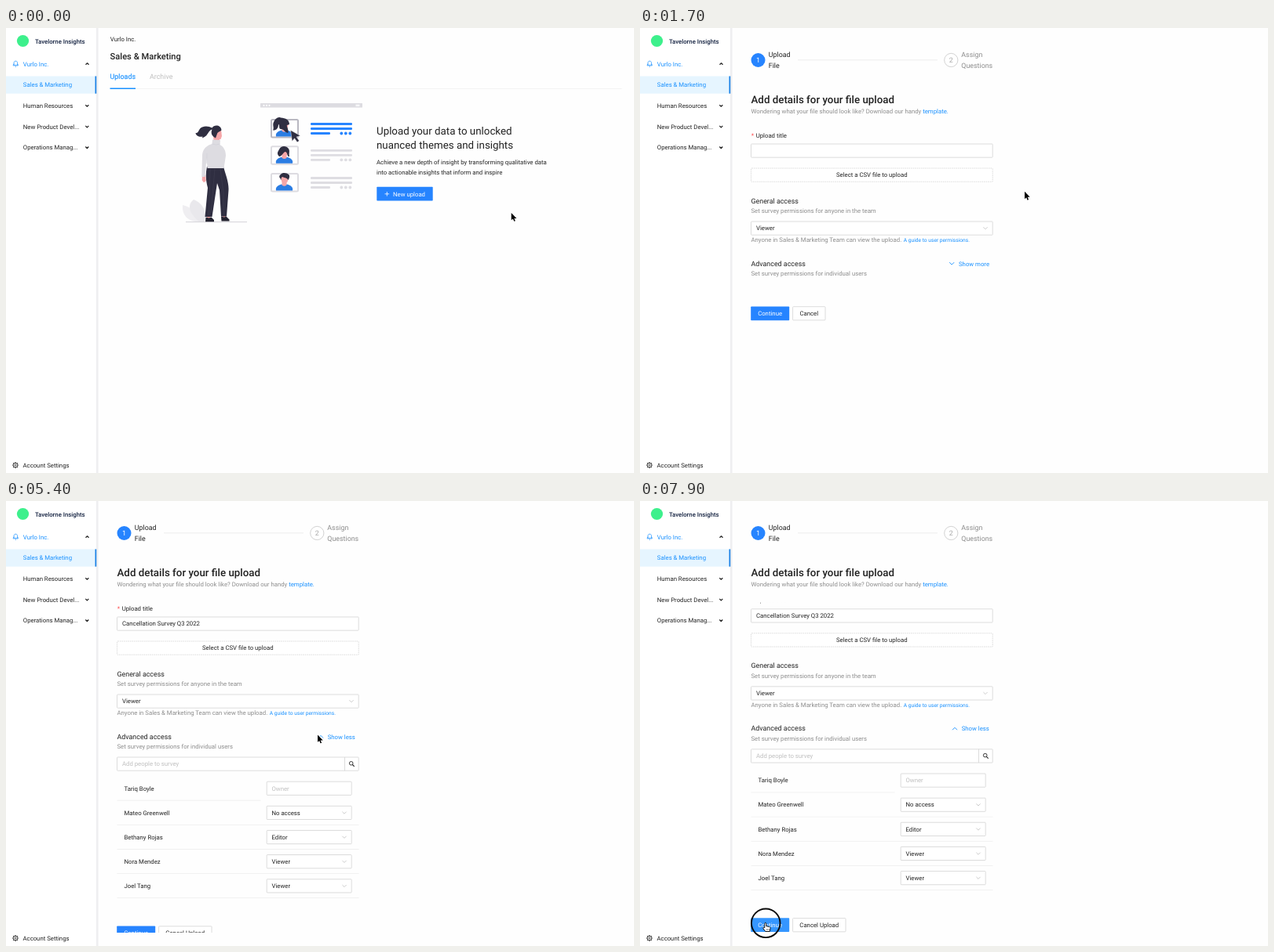
An HTML page for the animation above (8 s loop, 800 by 568 pixels).

```html
<!DOCTYPE html>
<html lang="en">
<head>
<meta charset="utf-8">
<title>Upload flow</title>
<style>
html, body { margin: 0; width: 100%; height: 100%; overflow: hidden; background: #fefefe; }
svg { display: block; width: 100vw; height: 100vh; font-family: Roboto, "Liberation Sans", sans-serif; text-rendering: geometricPrecision; }
text { white-space: pre; }
</style>
</head>
<body>
<svg id="stage" viewBox="0 0 800 568" preserveAspectRatio="none"></svg>
<script>
const INK = '#222', GREY = '#8c8c8c', PALE = '#bfbfbf', LINK = '#1890ff', BLUE = '#2684ff';
const DARK = '#2f2e41', SKIN = '#f5a6a8', CLOTH = '#dddce1', LINE = '#d4d4d4';
const S = 7.78, M = 8.89, L = 13.33;

const text = (x, y, s, size = S, fill = INK, more = '') =>
  `<text x="${x}" y="${y}" font-size="${size}" fill="${fill}" ${more}>${s.replace(/&/g, '&amp;')}</text>`;
const mid = (x, y, s, size = S, fill = INK) => text(x, y, s, size, fill, 'text-anchor="middle"');
const rect = (x, y, w, h, fill, more = '') =>
  `<rect x="${x}" y="${y}" width="${w}" height="${h}" fill="${fill}" ${more}/>`;
const box = (x, y, w, h = 17.2, more = '') =>
  rect(x, y, w, h, '#fff', `stroke="${LINE}" stroke-width=".8" rx=".8" ${more}`);
const disc = (x, y, r, fill, more = '') => `<circle cx="${x}" cy="${y}" r="${r}" fill="${fill}" ${more}/>`;
const shape = (d, fill, more = '') => `<path d="${d}" fill="${fill}" ${more}/>`;
const stroke = (d, color, w = .8, more = '') =>
  `<path d="${d}" fill="none" stroke="${color}" stroke-width="${w}" ${more}/>`;
const chevron = (x, y, r, color, w, up) => {
  const h = (up ? -1 : 1) * r / 2;
  return stroke(`M${x - r} ${y - h}L${x} ${y + h}L${x + r} ${y - h}`, color, w);
};
const group = (id, body, more = '') => `<g id="${id}" ${more}>${body}</g>`;

function sidebar() {
  const items = ['Human Resources', 'New Product Devel...', 'Operations Manag...'];
  let teeth = '';
  for (let i = 0; i < 8; i++) {
    const a = i * Math.PI / 4, c = Math.cos(a), s = Math.sin(a);
    teeth += `M${12 + 2.8 * c} ${558 + 2.8 * s}L${12 + 3.9 * c} ${558 + 3.9 * s}`;
  }
  return rect(0, 0, 115, 568, '#fff') +
    rect(115, 0, 2.5, 568, '#eeeef0') +
    disc(21.5, 16.5, 7.6, '#3df08c') +
    text(37, 19.7, 'Tavelorne Insights', S, '#12203f', 'font-weight="500"') +
    stroke('M12.3 42.2c2.2 0 2.2 1.6 2.2 3.2v2h-4.4v-2c0-1.6 0-3.2 2.2-3.2zM10 45.5l-1 2.2 1.8.6M14.6 45.5l1 2.2-1.8.6M12.3 47.5v2.6', LINK, .7) +
    text(21.8, 48.7, 'Vurlo Inc.', S, LINK) +
    chevron(103.5, 45.8, 2, INK, 1.3, true) +
    rect(0, 61.5, 115, 22.2, '#e6f5ff') + rect(113.5, 61.5, 1.7, 22.2, '#1980e6') +
    text(21.8, 75.3, 'Sales & Marketing', S, LINK) +
    items.map((s, i) => text(21.8, 102.1 + 26.67 * i, s) + chevron(103.3, 99.2 + 26.67 * i, 2, INK, 1.3)).join('') +
    disc(12, 558, 2.8, 'none', 'stroke="#333" stroke-width=".8"') +
    disc(12, 558, 1.1, 'none', 'stroke="#333" stroke-width=".7"') + stroke(teeth, '#333', 1.2) +
    text(21.5, 560.7, 'Account Settings');
}

function woman() {
  return shape('M244 247C232 247 224 239 225 226C237 229 244 236 247 247Z', '#efeef1') +
    shape('M246 247C232 236 231 225 239 219C252 224 256 236 253 247Z', '#e9e8ec') +
    stroke('M229 247.6H307', '#c9c8d0', .8) +
    shape('M256 236h5l-1 7h-4zM275 234h5v8h-4z', SKIN) +
    shape('M254.5 241.5l4 1 3-1 3.500 3.500v2.300h-11zM274 240.500l4 1 2.500-1 4 4v2h-10z', '#23222f') +
    shape('M250 187l4 1 .8 7-2.800 2.200-2.300-3z', SKIN) +
    shape('M256 177H277C280 188 284 197 283.500 207L281 240.500H274L272 207L269 198L262.500 241H253.500L257 204C254.500 195 254 186 256 177Z', DARK) +
    stroke('M260 180L258.500 239M266 180L261 236M273 180L277 210L277.500 238', '#48475a', .4) +
    shape('M264 138l8-1v9l-7 2z', SKIN) +
    shape('M263 142.500L273 143L272.500 149C278 152 280 157 280 163L277.500 179H256.500L255.500 166L253.500 190H249.300L250 164C250 154 256 150 262.500 148Z', CLOTH) +
    stroke('M256 160l-.4 13M262.500 148q5 2 10 0', '#cbcad2', .5) +
    shape('M264 130C269 126 275 129 274.500 134L275 138L273.500 142L268 142L264 138Z', SKIN) +
    shape('M274.500 130.500C272 133 270 132 269 135L267 140.500C262 138 260.500 134 262.500 129.500C257 131 258 138 250 140.500L250.500 138.500C246 139.500 242 137.500 241.500 134C246 135 245 128 250 126.500C255 124.500 259 126 262.500 127.500C265 123 274 123.500 274.500 130.500Z', DARK);
}

function card(y, edge, hair) {
  return rect(338, y + 1, 34, 22.5, '#fff', `stroke="${edge}" stroke-width="2" rx="1.5"`) +
    shape(`M344 ${y + 22.5}C343 ${y + 18} 346 ${y + 16} 351 ${y + 14.5}H358C363 ${y + 16} 366 ${y + 18} 365 ${y + 22.500}Z`, '#2b7de3') +
    shape(`M351.500 ${y + 9}h6v6.500q-3 2.500-6 0z`, SKIN) +
    `<ellipse cx="355" cy="${y + 7.500}" rx="4.500" ry="6" fill="${SKIN}"/>` + shape(hair, DARK);
}

function lines(y, color) {
  const bar = (dy, w) => rect(388, y + dy - 1.4, w, 2.8, color, 'rx="1.2"');
  return bar(0, 53) + bar(6, 53) + bar(12, 25) +
    [427.3, 432.8, 438.3].map(x => disc(x, y + 12, 1.9, color)).join('');
}

function landing() {
  const art = rect(324, 96, 130, 5.600, '#dddce1', 'rx=".6"') +
    [328.500, 332, 335.500].map(x => disc(x, 98.800, 1.100, '#fff')).join('') +
    rect(445.500, 97.500, 5, 2.600, '#f6f6f8') +
    card(116, '#b9b8c1', 'M350 129C347 129 349 123 347 123C347 128 344 131 340 130.500C342 127 339 124 341 120C343 116 346 113 350 114.500C356 115 361 117 361 123L358 124C357 125 360 128 359.500 134C354 133 355 129 350 129Z') +
    card(150.300, CLOTH, 'M348 164C344 160 347 157 348 155C350 150 357 150 360 154C362 157 360 160 361 164C358 165 359 159 356 158C353 158 352 164 348 164Z') +
    card(185, CLOTH, 'M349.500 192C347 190 349 187 350 187C352 184 358 185 360 187C362 188 361 192 359.500 194C358 191 354 191 352 190C350 191 351 194 350 194Z') +
    shape('M362.500 130.500L375 137.500L370 139L373.500 144L371 145.800L367.500 140.800L364.500 144.500Z', DARK, 'stroke="#fff" stroke-width=".4"') +
    lines(122.500, BLUE) + lines(156.300, '#dedde2') + lines(191.500, '#dedde2');
  const label = stroke('M482.500 211.800h5.600M485.300 209v5.600', '#fff', .8) + text(493, 214.600, 'New upload', S, '#fff');
  return text(132.800, 17, 'Vurlo Inc.') +
    text(132.600, 39.500, 'Sales & Marketing', 11.11, INK, 'font-weight="500"') +
    text(132.600, 65.300, 'Uploads', M, LINK, `stroke="${LINK}" stroke-width=".15"`) +
    text(183, 65.300, 'Archive', M, PALE) +
    rect(132.500, 77.300, 652, .7, '#f0f0f0') + rect(132.500, 76.500, 32.500, 1.500, LINK) +
    art + woman() +
    text(472, 136.300, 'Upload your data to unlocked', L) +
    text(472, 154.100, 'nuanced themes and insights', L) +
    text(472, 174.200, 'Achieve a new depth of insight by transforming qualitative data') +
    text(472, 186.700, 'into actionable insights that inform and inspire') +
    group('idle', rect(472.300, 202.800, 71.400, 17.800, BLUE, 'rx=".8"') + label) +
    group('hover', rect(472, 205, 72, 17.500, '#0002', 'rx="1"') +
      rect(471.800, 203.300, 72.200, 17.800, '#2a72dc', 'rx="1"') +
      `<g transform="translate(0 .5)" opacity=".85">${label}</g>`);
}

function buttons(y, label, w, id) {
  return rect(141.200, y, 49, 17.800, BLUE, `rx=".8" ${id}`) + mid(165.600, y + 11.600, 'Continue', S, '#fff') +
    box(194.600, y + .3, w) + mid(194.600 + w / 2, y + 11.600, label);
}

function people() {
  const rows = [['Tariq Boyle', 'Owner'], ['Mateo Greenwell', 'No access'], ['Bethany Rojas', 'Editor'],
    ['Nora Mendez', 'Viewer'], ['Joel Tang', 'Viewer']];
  return rows.map(([name, role], i) => {
    const y = 366.800 + 31.130 * i;
    return text(150.500, y + 2.700, name) + box(332.200, y - 8.600, 108) +
      text(338.500, y + 2.700, role, S, i ? INK : PALE) +
      (i ? chevron(431, y, 2.600, PALE, .8) : '') +
      rect(141.500, y + 15, i ? 308 : 183, .7, '#ececec');
  }).join('');
}

function form() {
  const head = disc(150.500, 41, 9, BLUE) + mid(150.500, 44.100, '1', M, '#fff') +
    text(163.800, 37.300, 'Upload', M) + text(163.800, 50.700, 'File', M) +
    rect(201, 40.500, 178, .8, '#e9e9e9') +
    disc(396.300, 41, 8.600, '#fff', `stroke="${PALE}" stroke-width=".7"`) + mid(396.300, 44.100, '2', M, '#a8a8a8') +
    text(409.300, 37.300, 'Assign', M, GREY) + text(409.300, 50.700, 'Questions', M, GREY) +
    text(141.500, 95.700, 'Add details for your file upload', L, INK, 'font-weight="500"') +
    `<text x="141.500" y="109.200" font-size="${S}" fill="${GREY}">Wondering what your file should look like? Download our handy <tspan fill="${LINK}">template.</tspan></text>`;
  const fields = text(141.800, 140, '*', S, '#ff4d4f') + text(147.700, 139.500, 'Upload title') +
    box(141.500, 148, 307.700) + group('title', text(148, 159.200, 'Cancellation Survey Q3 2022')) +
    box(141.500, 179, 307.700, 17.200, 'stroke-dasharray="1.600 1"') + mid(295.300, 190.200, 'Select a CSV file to upload') +
    text(141.500, 223.500, 'General access', M) +
    text(141.500, 236.300, 'Set survey permissions for anyone in the team', S, GREY) +
    box(141.500, 247, 307.700) + text(148, 258.300, 'Viewer') + chevron(440, 255.500, 2.600, PALE, .8) +
    text(141.500, 273.100, 'Anyone in Sales & Marketing Team can view the upload.', S, GREY) +
    text(335.800, 273.100, 'A guide to user permissions.', 6.670, LINK) +
    text(141.500, 303.700, 'Advanced access', M) +
    text(141.500, 316.300, 'Set survey permissions for individual users', S, GREY);
  const closed = chevron(397.200, 300.600, 3, LINK, .9) + text(406, 303.500, 'Show more', S, LINK) +
    buttons(355.400, 'Cancel', 41.400, '');
  const open = chevron(401, 300.900, 3, LINK, .9, true) + text(409.700, 303.500, 'Show less', S, LINK) +
    box(141.500, 327, 307.700) + rect(431.200, 327, .8, 17.200, LINE) +
    text(148, 338.300, 'Add people to survey', S, PALE) +
    disc(439.700, 334.800, 2.300, 'none', `stroke="${INK}" stroke-width=".9"`) +
    stroke('M441.400 336.500l2.300 2.300', INK, 1.100) +
    people() + buttons(542.500, 'Cancel Upload', 67.400, 'id="go"');
  return head + `<g clip-path="url(#pane)">` +
    group('scroll', fields + group('closed', closed) + group('open', open)) + '</g>';
}

document.getElementById('stage').innerHTML =
  '<clipPath id="pane"><rect x="120" y="129.700" width="680" height="421.300"/></clipPath>' +
  rect(0, 0, 800, 568, '#fefefe') + sidebar() + group('landing', landing()) + group('form', form()) +
  disc(160.200, 538.800, 18.300, 'none', 'id="ring" stroke="#0a0a0a" stroke-width="1.900"') +
  group('arrow', shape('M0 0V9.300L2.100 7.400 3.600 10.800 5.100 10.200 3.700 6.900H6.700Z', '#000',
    'stroke="#fff" stroke-width="1.100" paint-order="stroke"')) +
  group('hand', shape('M-1.200 1C-1.200-.5 .9-.5 .9 1V4.200L4.600 4.900C6 5.300 6.200 6 6 7.200L5.200 11H-.2L-3 7.200C-3.700 6-2.400 5.100-1.200 6.300Z', '#fff',
    'stroke="#000" stroke-width=".9"') + stroke('M1.100 7.500v2M2.700 7.500v2M4.200 7.500v2', '#000', .4));

// time, x, y of the pointer tip
const path = [[0, 643.700, 236], [900, 507.800, 212.500], [1600, 507.800, 212.500], [2200, 241.800, 157.800],
  [2700, 241.800, 157.800], [3100, 397, 254], [3500, 397, 254], [4100, 420, 284], [4400, 398.500, 299.500],
  [4800, 398.500, 299.500], [5400, 397, 298.500], [5600, 397, 298.500], [6200, 351.500, 328],
  [6500, 351.500, 328.500], [6700, 346.500, 333], [6800, 346.500, 333], [7700, 160, 538.500], [8000, 160, 538.500]];
const scrolling = [[0, 0], [6000, 0], [6300, -10.200], [8000, -10.200]];

function at(keys, t) {
  const i = keys.findIndex(k => k[0] > t), a = keys[i - 1], b = keys[i];
  const p = (t - a[0]) / (b[0] - a[0]), e = (1 - Math.cos(Math.PI * p)) / 2;
  return a.slice(1).map((v, n) => v + (b[n + 1] - v) * e);
}

const $ = id => document.getElementById(id);
const show = (id, on) => { $(id).style.display = on ? '' : 'none'; };
const LOOP = 8000, TICK = 100;

function draw(ms) {
  const t = Math.floor(ms % LOOP / TICK) * TICK;
  const [x, y] = at(path, t), [dy] = at(scrolling, t);
  const opened = t >= 5000, pressed = t >= 7700;
  const hand = (t >= 4400 && t < 5000) || pressed;
  show('landing', t < 1200);
  show('form', t >= 1200);
  show('idle', t < 1000);
  show('hover', t >= 1000);
  show('title', t >= 2400);
  show('closed', !opened);
  show('open', opened);
  show('ring', t >= 7800);
  show('hand', hand);
  show('arrow', !hand);
  $('go').setAttribute('fill', pressed ? '#3596ff' : BLUE);
  $('scroll').setAttribute('transform', `translate(0 ${dy})`);
  for (const id of ['arrow', 'hand']) $(id).setAttribute('transform', `translate(${x} ${y})`);
}

const start = performance.now();
function tick() {
  draw(performance.now() - start);
  requestAnimationFrame(tick);
}
tick();
</script>
</body>
</html>
```
